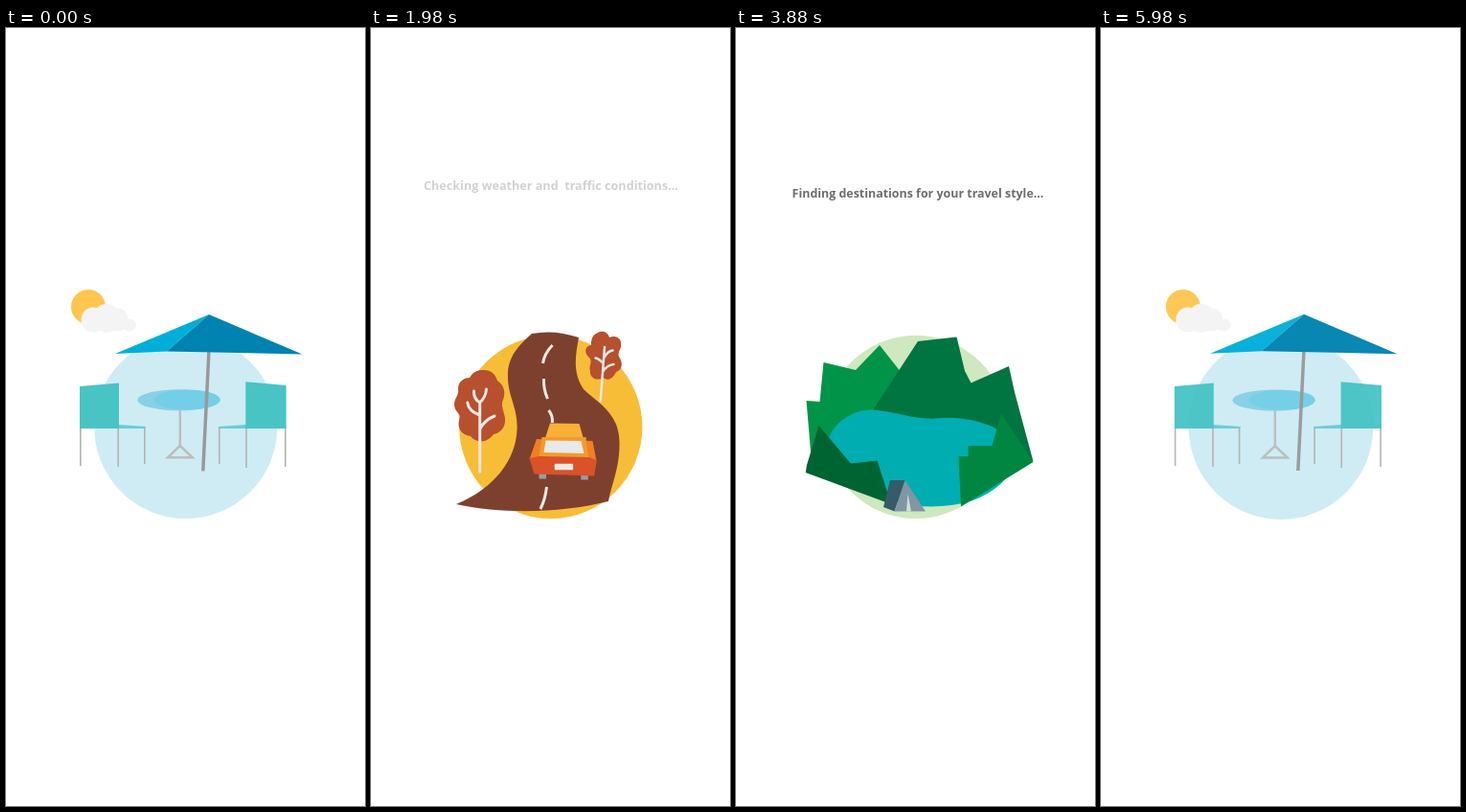
These frames come from a looping animation (375 px wide and 812 px high, 6 s). An HTML page:

```html
<!DOCTYPE html>
<html lang="en">
<head>
<meta charset="utf-8">
<title>Trip loader</title>
<style>
html, body { margin: 0; width: 100%; height: 100%; overflow: hidden; background: #fff; }
svg { display: block; width: 100vw; height: 100vh; }
text {
  font-family: "Open Sans", Lato, sans-serif;
  font-weight: 700;
  font-stretch: 75%;
  fill: #58595b;
  text-anchor: middle;
  white-space: pre;
}
</style>
</head>
<body>
<svg id="stage" viewBox="0 0 375 812">
  <circle id="disc"/>
  <g id="art"></g>
  <g id="words"></g>
</svg>
<script>
const LOOP = 6000, STEP = 1500, OUT = 120, SWAP = 280, REACH = 7;
const NS = "http://www.w3.org/2000/svg";
const $ = id => document.getElementById(id);

const poly = (fill, points) => `<polygon fill="${fill}" points="${points}"/>`;
const path = (fill, d) => `<path fill="${fill}" d="${d}"/>`;
const line = (color, width, d, cap = "butt") =>
  `<path fill="none" stroke="${color}" stroke-width="${width}" stroke-linecap="${cap}" d="${d}"/>`;
const oval = (fill, x, y, rx, ry = rx) =>
  `<ellipse fill="${fill}" cx="${x}" cy="${y}" rx="${rx}" ry="${ry}"/>`;
const box = (fill, x, y, w, h, r = 0) =>
  `<rect fill="${fill}" x="${x}" y="${y}" width="${w}" height="${h}" rx="${r}"/>`;

function scallops(fill, x0, y0, x1, y1, nx, ny, r) {
  let s = box(fill, x0, y0, x1 - x0, y1 - y0);
  for (let i = 0; i <= nx; i++) {
    const x = x0 + (x1 - x0) * i / nx;
    s += oval(fill, x, y0, r) + oval(fill, x, y1, r);
  }
  for (let i = 1; i < ny; i++) {
    const y = y0 + (y1 - y0) * i / ny;
    s += oval(fill, x0, y, r) + oval(fill, x1, y, r);
  }
  return s;
}

function zigzag(fill, x0, y0, x1, y1, nx, ny, a) {
  const pts = [];
  const side = (ax, ay, bx, by, n, ox, oy) => {
    for (let i = 0; i < n * 2; i++) {
      const k = i / (n * 2), out = i % 2 ? a : 0;
      pts.push([ax + (bx - ax) * k + ox * out, ay + (by - ay) * k + oy * out]);
    }
  };
  side(x0, y0, x1, y0, nx, 0, -1);
  side(x1, y0, x1, y1, ny, 1, 0);
  side(x1, y1, x0, y1, nx, 0, 1);
  side(x0, y1, x0, y0, ny, -1, 0);
  return poly(fill, pts.join(" "));
}

const LEG = "#b1b3b4", TEAL = "#48c4c5", SEAT = "#6accd6", WOOD = "#e8e6e3", LEAF = "#b6502f";

// Each part: outward direction x, y and its drawing.
const scenes = [
  { color: [207, 236, 244], drift: 1.12, parts: [
    [-1, 0, oval("#ffc64f", 86, 291, 18) +
      oval("#f4f4f4", 91, 304.5, 12.5, 13) + oval("#f4f4f4", 105, 303, 14.5, 15) +
      oval("#f4f4f4", 117, 304.5, 10.5, 12) + oval("#f4f4f4", 128.5, 310, 7.5, 6.5)],
    [0, 1, line("#bdbdbd", 2.5, "M181.8 398V436L169 448.3H194.8L181.8 436") +
      oval("#88d0e5", 180.5, 388.3, 43.2, 11) + oval("#72cfe7", 189.2, 388, 34.5, 10.5)],
    [-1, 0, line(LEG, 1.6, "M77.8 417V457M117.2 417V458M144.8 416V455") +
      poly(SEAT, "117,414 146,416 145.5,418 117,418") +
      poly(TEAL, "77,374 118,370.5 118,418 77,418")],
    [1, 0, line(LEG, 1.6, "M291.8 417V458M251 417V459M222.8 416V455") +
      poly(SEAT, "222,416 251,414 251,418 222,418") +
      poly(TEAL, "250.3,369.3 292.7,373 292.7,418 250.3,418")],
    [0, -1, line("#999", 3.5, "M212 336L205.8 462.3") +
      poly("#00aeda", "212,299 114,340 168,337.5") +
      poly("#0083b0", "212,299 168,337.5 309.5,340.5")]
  ] },
  { color: [248, 189, 55], drift: 0, parts: [
    [0, -1, path("#7e402e", "M168 319Q192 314.5 217 323C213 345 211 360 222 377C238 392 259 402 259.5 432C260 460 251 476 248 494C200 506 140 508 89 497C130 480 151 450 152.5 420C154 395 142 385 143 360C144 340 158 328 168 319Z") +
      line("#eee9e4", 3, "M189.5 331Q181 340 179.5 350M180.5 366Q180 377 184.5 387M185.5 399Q190 404 189.5 412M183.5 479Q182 492 177 502")],
    [-1, 0, path(LEAF, "M117 357C128 357 130 363 132 368C141 374 140 383 138 388C135 394 139 400 140 407C141 418 134 423 128 424C121 434 109 433 104 426C94 425 90 417 92 409C95 402 87 401 87 393C87 386 92 384 91 377C91 368 98 365 103 365C107 358 112 357 117 357Z") +
      line(WOOD, 3, "M113.7 463V390M113.7 404Q102 400 100.8 391M113.7 391Q107 387 107.5 379M113.7 391Q120 385 120.5 377M114 418Q119 409 129 405", "round")],
    [1, 0, path(LEAF, "M237 318C242 315 248 318 249 323C255 320 262 324 261 330C262 335 257 338 259 343C264 350 262 357 256 359C253 366 247 369 243 365C236 369 228 365 229 358C227 353 231 351 229 345C222 340 223 332 230 331C230 325 231 320 237 318Z") +
      line(WOOD, 2.5, "M239.7 389.5L244 333M242.5 350Q238 345 234.5 344.5M243 345Q247 337 252.5 336.5M242 359Q246 352 253.5 351", "round")],
    [0, 1, box("#9c9c9c", 175.5, 463, 7.5, 7.5) + box("#9c9c9c", 219.3, 464, 7.5, 7.5) +
      poly("#f07f26", "173,429 231.5,431 235.5,452 165.5,450") +
      poly("#f8b036", "187,412.5 217.5,413 228,450 175.5,448") +
      poly("#f39a2c", "178.5,427 224.5,427 227,449 175.5,448") +
      poly("#d9522a", "165.5,449 176,447 228,448 236,451 233,467.5 170.5,465.5") +
      poly("#e7e9ea", "182.5,430.5 219.5,431 222.5,444 180.5,443") +
      box("#f0e8e3", 191.7, 454.7, 19.5, 6.5, 1)]
  ] },
  { color: [206, 232, 191], drift: 0, parts: [
    [0, -1, poly("#009449", "91.5,349 125,357 150,331 176,364 154,406 139,406 79,454 73.5,389 87.5,390")],
    [0, -1, poly("#007441", "190,327 230.5,322.5 239,358 245.5,370.5 285,353 291,380 310.5,452.5 277,429 255,419 139,405")],
    [0, 1, path("#00adb0", "M94 440C96 415 120 398 142 398.5C165 400 188 409 208 407.5C235 404 275 412 288 432C300 450 285 480 245 494C210 504 165 500 130 483C108 472 94 460 94 440Z")],
    [1, 0, poly("#008641", "277,402 310.5,453 235,499.5 232.5,447 242.5,447 242.5,436 267.5,436")],
    [-1, 0, poly("#006432", "86.5,415 120,454.5 147.5,451.5 162,497 72.7,464 74,456")],
    [0, -1, poly("#345c67", "161,472 177,472 165.5,504.5 154,500") +
      poly("#8195a3", "176.5,472 198,504.5 165.5,504.5") +
      poly("#cee3cf", "179.5,486 183,504.5 178,504.5")]
  ] },
  { color: [251, 213, 217], drift: 0, parts: [
    [-1, 0, scallops("#a07893", 83.3, 343.3, 174.5, 468.7, 5, 6, 7.5) +
      box("#f4f4f4", 93, 358.7, 73, 93.3)],
    [1, 0, zigzag("#88517f", 198.5, 362, 309.5, 451, 6, 5, 5) +
      box("#f4f4f4", 209.3, 373.5, 89.7, 67)],
    [0, 1, oval("#ed7d70", 155.8, 448.5, 26) +
      path("#ed7d70", "M145 468C132 492 130 530 144 562.3Q165 564 184 560C192 530 190 500 171 468Z")],
    [0, 1, oval("#e64d52", 206.5, 451, 27.3) +
      path("#e64d52", "M193 472C178 495 175 525 180.5 566.5Q208 573 235 566.3C244 530 240 497 219 471Z")]
  ] }
];

const lines = [
  { say: "Checking weather and  traffic conditions...", x: 188, width: 266, from: 10, to: 1850 },
  { say: "Finding destinations for your travel style...", x: 190, width: 263, from: 2060, to: 3860 },
  { say: "Calculating routes...", x: 189.7, width: 151, from: 4070, to: 5670 }
];

const clamp = v => Math.min(1, Math.max(0, v));
const smooth = v => v * v * (3 - 2 * v);
const easeOut = v => 1 - (1 - v) * (1 - v);

function add(tag, parent) {
  return parent.appendChild(document.createElementNS(NS, tag));
}

for (const scene of scenes) {
  scene.nodes = scene.parts.map(part => {
    const g = add("g", $("art"));
    g.innerHTML = part[2];
    return g;
  });
}

for (const item of lines) {
  const node = item.node = add("text", $("words"));
  node.textContent = item.say;
  node.setAttribute("x", item.x);
  node.setAttribute("y", 179);
  node.style.fontSize = "16px";
  const size = 16 * item.width / node.getComputedTextLength();
  node.style.fontSize = size.toFixed(2) + "px";
}

function place(node, x, y, alpha) {
  node.setAttribute("transform", `translate(${x.toFixed(3)} ${y.toFixed(3)})`);
  node.setAttribute("opacity", alpha.toFixed(3));
  node.setAttribute("display", alpha > 0.002 ? "inline" : "none");
}

function drawDisc(now, prev, u, enter) {
  const grow = 0.2 * (u < OUT ? easeOut(u / OUT) : 1 - enter);
  const mix = clamp(u / OUT);
  const rgb = now.color.map((c, i) => Math.round(prev.color[i] + (c - prev.color[i]) * mix));
  const disc = $("disc");
  disc.setAttribute("cx", 187.8 + 18 * grow);
  disc.setAttribute("cy", 416.4 + 25 * grow);
  disc.setAttribute("r", 95.6 * (1 + grow));
  disc.setAttribute("fill", `rgb(${rgb})`);
}

function draw(t) {
  const p = (t + SWAP) % LOOP;
  const index = Math.floor(p / STEP), u = p % STEP;
  const now = scenes[index], prev = scenes[(index + 3) % 4];
  const enter = smooth(clamp((u - OUT) / (SWAP - OUT)));
  drawDisc(now, prev, u, enter);

  for (const scene of scenes) {
    const alpha = scene === now ? enter : scene === prev ? 1 - clamp(u / OUT) : 0;
    const held = scene === now ? Math.max(0, u - SWAP) : STEP - SWAP;
    const shift = scene.drift * held / 1000 + (scene === now ? REACH * (1 - enter) : 0);
    scene.parts.forEach(([dx, dy], i) => place(scene.nodes[i], dx * shift, dy * shift, alpha));
  }

  for (const item of lines) {
    const a = clamp((t - item.from) / 180), b = clamp((t - item.to) / 180);
    place(item.node, 0, 10 * (1 - easeOut(a)) - 11 * easeOut(b), a * (1 - b));
  }
}

const start = performance.now();
function tick() {
  draw((performance.now() - start) % LOOP);
  requestAnimationFrame(tick);
}
tick();
</script>
</body>
</html>
```
